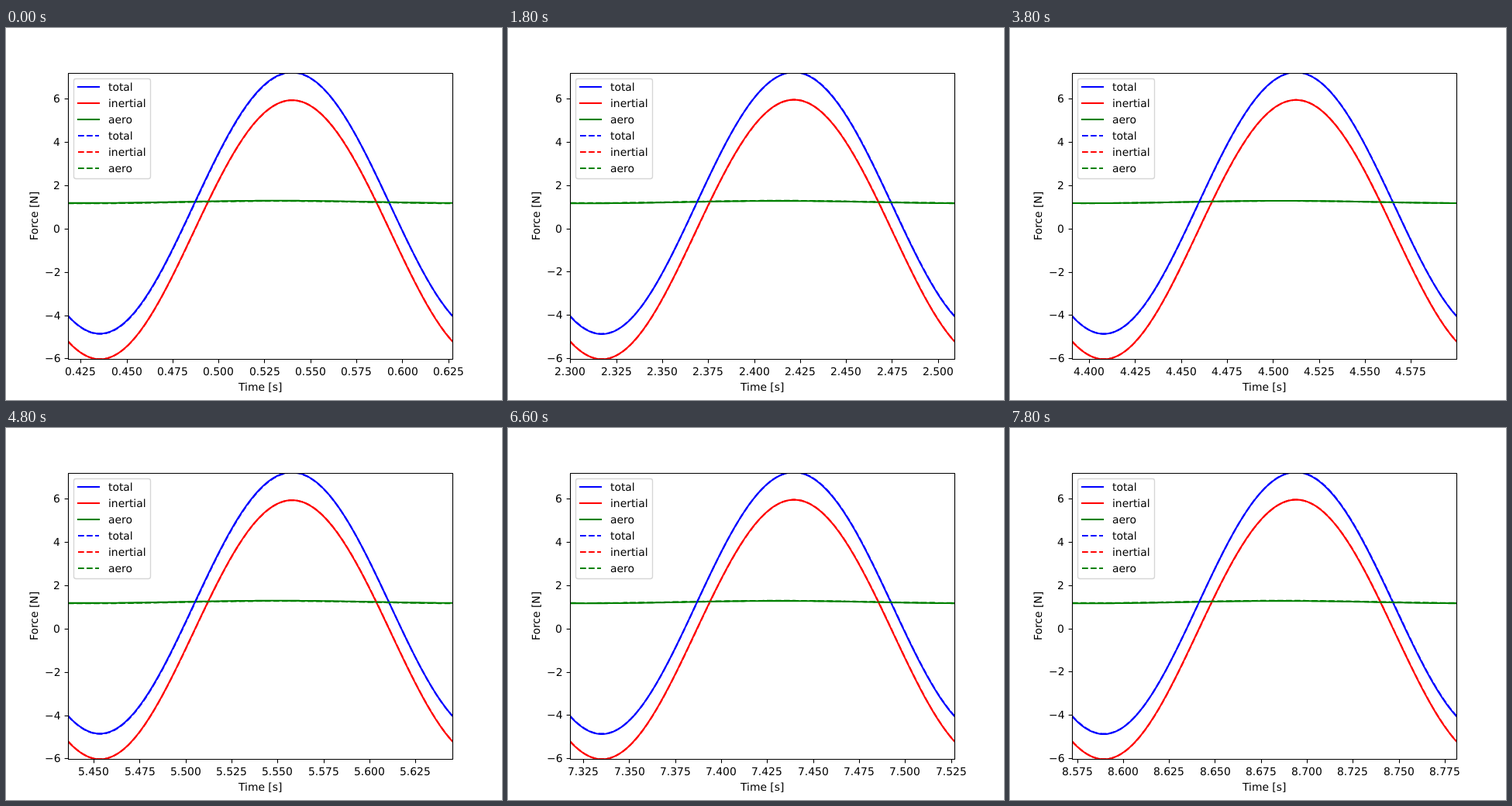
These frames come from a looping animation (640 by 480 pixels, 8000 ms). An HTML page with a canvas:

```html
<!DOCTYPE html>
<html lang="en">
<head>
<meta charset="utf-8">
<title>Force over time</title>
<style>
  html, body { margin: 0; width: 100%; height: 100%; overflow: hidden; background: #fff; }
  canvas { display: block; }
</style>
</head>
<body>
<canvas id="plot" width="640" height="480"></canvas>
<script>
const ctx = document.getElementById('plot').getContext('2d');

const STEP_MS = 200, STEPS = 40;
const PERIOD = 0.2090795;         // seconds shown in one window
const TICK = 0.025;
const BOX = { left: 80, right: 576, top: 57.6, bottom: 427.2 };
const WIDTH = BOX.right - BOX.left;
const PEAK = 369.1;
const LINE = 2.083, DASH = [7.71, 3.33];
const BLUE = '#0000ff', RED = '#ff0000', GREEN = '#008000';
const FONT = '13.889px "DejaVu Sans", sans-serif';

const wave = (x, peak) => Math.cos(2 * Math.PI * (x - peak) / WIDTH);
const snap = v => Math.floor(v + 0.5) + 0.5;

// The measured (solid) force wanders slowly around the periodic model (dashed),
// and the vertical range follows its maximum.
const drift = k => 0.0145 * Math.cos(2 * Math.PI * k / 24.5);
const yMin = -6.03;
const yMax = k => 7.195 + drift(k);

function yPos(v, k) {
  return BOX.bottom - (v - yMin) / (yMax(k) - yMin) * (BOX.bottom - BOX.top);
}

function inertial(x, shift = 0) {
  const c = wave(x, PEAK + shift);
  return -0.05 + 5.985 * c + 0.125 * (1 - c * c);
}
const aeroModel = x => 1.222 + 0.055 * wave(x, 350);
const aero = (x, k) => aeroModel(x) + drift(k);

function segment(x1, y1, x2, y2) {
  ctx.beginPath();
  ctx.moveTo(x1, y1);
  ctx.lineTo(x2, y2);
  ctx.stroke();
}

function setLine(color, dashed) {
  ctx.strokeStyle = color;
  ctx.lineWidth = LINE;
  ctx.lineJoin = 'round';
  ctx.lineCap = dashed ? 'butt' : 'square';
  ctx.setLineDash(dashed ? DASH : []);
}

function label(text, x, y, align = 0) {
  ctx.fillText(text, Math.round(x - align * ctx.measureText(text).width), y);
}

function drawCurves(k) {
  const curve = (fn, color, dashed) => {
    setLine(color, dashed);
    ctx.beginPath();
    for (let x = BOX.left; x <= BOX.right; x += 2) ctx.lineTo(x, yPos(fn(x), k));
    ctx.stroke();
  };
  ctx.save();
  ctx.beginPath();
  ctx.rect(BOX.left, 58, WIDTH, 369);
  ctx.clip();
  curve(x => inertial(x) + aero(x, k), BLUE, false);
  curve(x => inertial(x), RED, false);
  curve(x => aero(x, k), GREEN, false);
  curve(x => inertial(x, 0.2) + aeroModel(x), BLUE, true);
  curve(x => inertial(x, 0.2), RED, true);
  curve(aeroModel, GREEN, true);
  ctx.restore();
}

function drawAxes(k) {
  const left = snap(BOX.left), right = snap(BOX.right);
  const top = snap(BOX.top), bottom = snap(BOX.bottom);
  ctx.strokeStyle = ctx.fillStyle = '#000';
  ctx.lineWidth = 1.11;
  ctx.lineCap = 'butt';
  ctx.setLineDash([]);
  ctx.strokeRect(left, top, right - left, bottom - top);

  const start = PERIOD * (k + 2);
  for (let n = Math.ceil(start / TICK); n * TICK <= start + PERIOD; n++) {
    const x = BOX.left + (n * TICK - start) / PERIOD * WIDTH;
    segment(snap(x), bottom, snap(x), bottom + 4.9);
    label((n * TICK).toFixed(3), x, 448, 0.5);
  }
  for (let v = -6; v <= 6; v += 2) {
    const y = yPos(v, k);
    segment(left - 4.9, snap(y), left, snap(y));
    label(String(v).replace('-', '\u2212'), 70.3, Math.round(y + 5), 1);
  }

  label('Time [s]', 328, 468, 0.5);
  ctx.save();
  ctx.translate(41, 242);
  ctx.rotate(-Math.PI / 2);
  label('Force [N]', 0, 0, 0.5);
  ctx.restore();
}

function drawLegend() {
  ctx.setLineDash([]);
  ctx.beginPath();
  ctx.roundRect(87.5, 65.5, 99, 129, 2.8);
  ctx.fillStyle = 'rgba(255,255,255,0.8)';
  ctx.fill();
  ctx.strokeStyle = 'rgba(204,204,204,0.8)';
  ctx.lineWidth = 1.39;
  ctx.stroke();

  ctx.fillStyle = '#000';
  const rows = [['total', BLUE], ['inertial', RED], ['aero', GREEN]];
  for (let i = 0; i < 6; i++) {
    const [name, color] = rows[i % 3];
    const y = 76 + 21 * i;
    setLine(color, i > 2);
    segment(93, y, 120, y);
    label(name, 132, y + 5);
  }
}

function draw(k) {
  ctx.fillStyle = '#fff';
  ctx.fillRect(0, 0, 640, 480);
  ctx.font = FONT;
  ctx.textRendering = 'geometricPrecision';
  drawCurves(k);
  drawAxes(k);
  drawLegend();
}

const origin = performance.now();
function tick(now) {
  draw(Math.floor(Math.max(0, now - origin) / STEP_MS) % STEPS);
  requestAnimationFrame(tick);
}
tick(origin);
</script>
</body>
</html>
```
